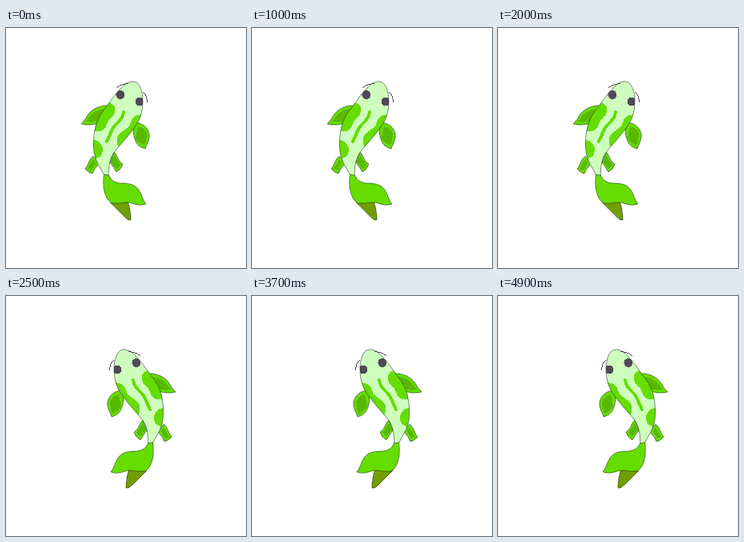
An HTML page for the animation above (5 s loop, 300 by 300 pixels).

```html
<!DOCTYPE html>
<html lang="en">
<head>
<meta charset="utf-8">
<title>Swimming koi</title>
<style>
  html, body { margin: 0; width: 100%; height: 100%; overflow: hidden; background: #fff; }
  svg { display: block; width: 100vw; height: 100vh; shape-rendering: crispEdges; }
  .line { stroke: #1c2818; stroke-width: .55; stroke-linejoin: round; }
  .pale { fill: #cffdbd; }
  .green { fill: #65dd00; }
  .deep { fill: #59b800; }
  .olive { fill: #729f00; }
  .eye { fill: #504959; }
  .whisker { fill: none; stroke: #222; stroke-width: .8; }
  .stripe { fill: none; stroke: #65dd00; stroke-width: 4; stroke-linecap: round; }
  .edge { fill: none; }
</style>
</head>
<body>
<svg viewBox="0 0 300 300">
  <defs>
    <path id="body" d="M160 67C167 68 171 79 171 91C171 106 167 116 160 125C151 138 141 147 134 157C128 167 129 176 128 184L122 183C119 176 114 170 112 163C108 152 109 135 112 123C115 111 122 103 128 95C133 88 137 82 142 77C147 71 153 66 160 67Z"/>
    <clipPath id="inside"><use href="#body"/></clipPath>
  </defs>
  <g id="fish">
    <!-- tail -->
    <path class="olive line" d="M130 218L152 216C155 224 156 233 156 240Q153 241 149 237Z"/>
    <path class="green line" d="M123 181L127 181C130 189 134 193 143 194C153 194 160 195 165 201C170 207 170 214 175 220Q168 223 160 220C151 216 144 220 132 219Q126 215 124 208C121 199 121 189 123 181Z"/>
    <!-- fins -->
    <path class="green line" d="M129 97C116 96 107 102 102 109Q99 115 94 120Q105 123 119 118Z"/>
    <path class="deep" d="M124 101C113 101 107 107 100 117Q110 119 118 115Z"/>
    <path class="green line" d="M162 118C171 119 177 124 179 132C180 140 176 145 174 151C166 149 160 144 159 128Z"/>
    <path class="deep" d="M165 123Q173 125 176 132Q176 140 173 147Q166 144 162 138Z"/>
    <path class="green line" d="M109 160C103 165 103 172 99 176Q103 181 108 182Q110 176 116 170Z"/>
    <path class="deep" d="M109 164L102 176L107 178L112 169Z"/>
    <path class="green line" d="M135 155C140 160 140 167 146 170Q144 177 138 180Q134 173 130 168Z"/>
    <path class="deep" d="M135 159L143 171L138 176L131 167Z"/>
    <!-- body and markings -->
    <use href="#body" class="pale"/>
    <g clip-path="url(#inside)">
      <path class="green" d="M126 93C133 92 138 99 136 105C135 112 128 113 126 120C124 127 119 131 108 129V100Z"/>
      <path class="green" d="M172 108C163 108 157 111 156 118C155 125 149 126 143 131C138 135 137 142 141 150L160 145L174 120Z"/>
      <path class="green" d="M105 139C115 139 121 145 121 152C121 159 117 164 109 163Z"/>
      <circle class="eye" cx="143" cy="83.500" r="5.500"/>
      <circle class="eye" cx="167" cy="92" r="5.500"/>
    </g>
    <path class="stripe" d="M147 105C146 113 141 117 136 122C131 127 130 135 126 142"/>
    <use href="#body" class="edge line"/>
    <path class="whisker" d="M153 69.500Q143 70 138 75M171 80Q177 84 176 93"/>
  </g>
</svg>
<script>
  const HALF_BEAT = 500;
  const MIRROR = "matrix(-1 0 0 1 306 0)";
  const fish = document.getElementById("fish");
  const start = performance.now();

  function draw(time) {
    const mirrored = Math.floor(time / HALF_BEAT) % 2 === 1;
    fish.setAttribute("transform", mirrored ? MIRROR : "");
  }

  function tick() {
    draw(performance.now() - start);
    requestAnimationFrame(tick);
  }
  draw(0);
  requestAnimationFrame(tick);
</script>
</body>
</html>
```
